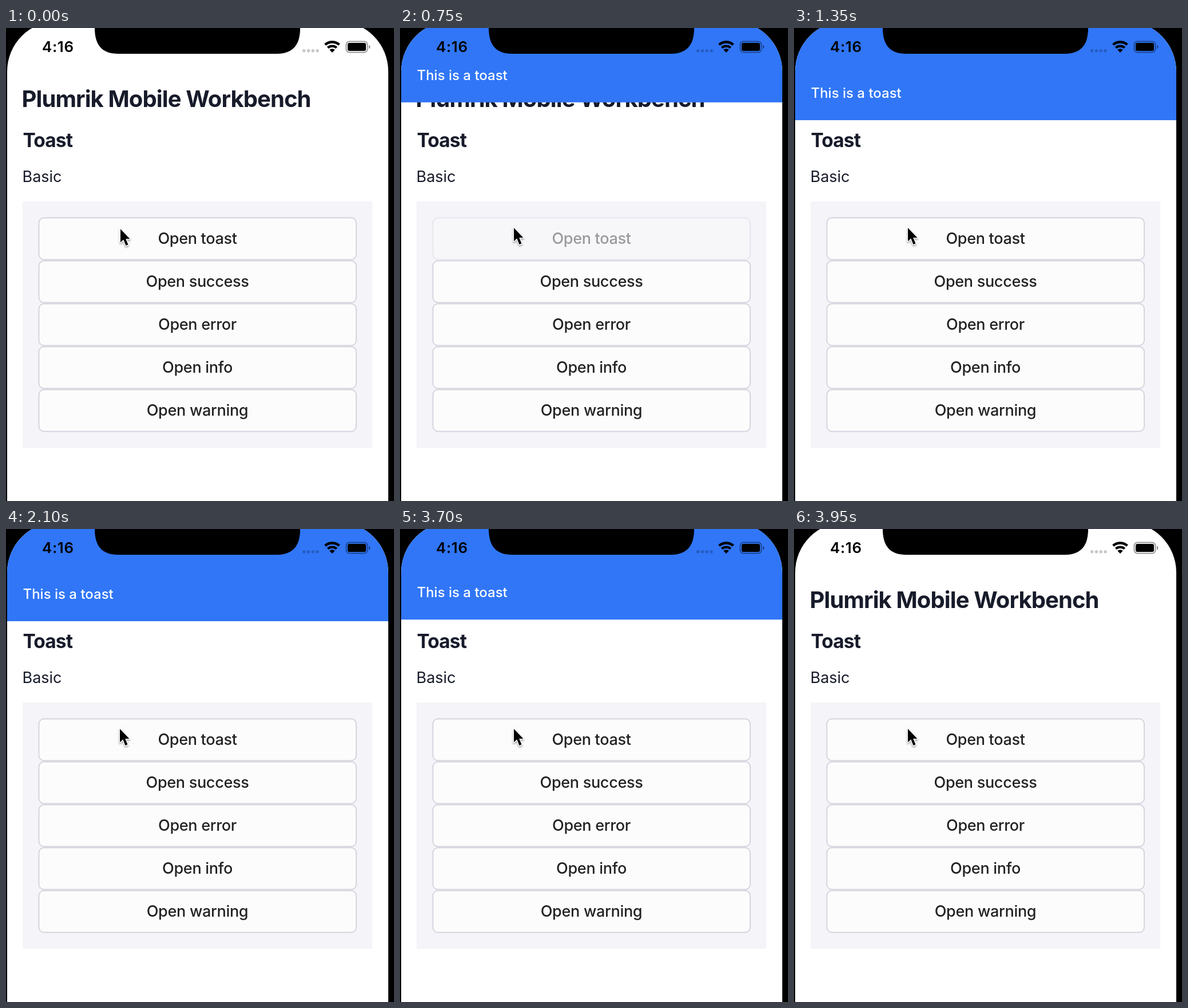
Write an HTML page that moves like this. It is 678 px wide and 826 px high and loops after 4.8 s.

```html
<!DOCTYPE html>
<html lang="en">
<head>
<meta charset="utf-8">
<title>Toast</title>
<style>
  html, body { margin: 0; width: 100%; height: 100%; overflow: hidden; background: #000; }
  svg { display: block; font-family: Inter, "Liberation Sans", sans-serif; }
  .dark { fill: #171b2a; }
  .button rect { fill: #fcfcfc; stroke: #d6d5de; stroke-width: 2; }
  .button text { fill: #222; font-size: 27px; font-weight: 500; letter-spacing: -.3px; text-anchor: middle; }
  #cursor path { stroke: #fff; stroke-width: 3; stroke-linejoin: round; paint-order: stroke; filter: drop-shadow(0 2px 1.5px rgba(0, 0, 0, .35)); }
</style>
</head>
<body>
<svg width="678" height="826" viewBox="0 0 678 826">
  <clipPath id="screen"><rect x="2" y="-12" width="666" height="1000" rx="88"/></clipPath>
  <g clip-path="url(#screen)">
    <rect width="678" height="826" fill="#fff"/>
    <g class="dark">
      <text x="27.5" y="138" font-size="40" font-weight="700" letter-spacing="-.9">Plumrik Mobile Workbench</text>
      <text x="29.5" y="208" font-size="33.5" font-weight="700" letter-spacing="-.9">Toast</text>
      <text x="28.5" y="269" font-size="27">Basic</text>
    </g>
    <rect x="29" y="303" width="611" height="430" fill="#f4f4f9"/>
    <g id="buttons"></g>
    <g id="toast">
      <rect y="-40" width="678" height="201" fill="#3076f7"/>
      <text x="29.5" y="122" font-size="24" font-weight="500" fill="#fff">This is a toast</text>
    </g>
  </g>

  <!-- Notch and status bar -->
  <path d="M155 0C155 30 168 45 196 45H473C501 45 514 30 514 0Z"/>
  <text x="63" y="42" font-size="26" font-weight="600" letter-spacing=".6">4:16</text>
  <path d="M520.7 39.8h24" stroke="#000" stroke-opacity=".22" stroke-width="5.4" stroke-linecap="round" stroke-dasharray="0 7.8"/>
  <g fill="none" stroke="#000">
    <path d="M557.6 29.2a18.6 18.6 0 0 1 24.8 0" stroke-width="4.4"/>
    <path d="M562.3 34.5a11.5 11.5 0 0 1 15.4 0" stroke-width="4.2"/>
  </g>
  <path d="M570 43L565.3 38.1a6.8 6.8 0 0 1 9.4 0Z"/>
  <rect x="594.5" y="23.5" width="37" height="19" rx="5.5" fill="none" stroke="#000" stroke-opacity=".4" stroke-width="2"/>
  <rect x="597" y="26" width="32" height="14" rx="3"/>
  <path d="M634 29.5q2.5 1 2.5 3.5t-2.5 3.5Z" fill-opacity=".45"/>

  <g id="cursor"><path d="M0 0V23.5L5.3 18.5L9.5 29L13.5 27.3L9.2 17.3H16.5Z"/></g>
</svg>
<script>
  const LOOP = 4800, STEP = 50, PRESS = 550, RELEASE = 660;
  const SHOW = 547, HIDE = 3691, TRAVEL = 322;
  const $ = id => document.getElementById(id);

  $('buttons').innerHTML = ['toast', 'success', 'error', 'info', 'warning'].map((name, i) =>
    `<g class="button" transform="translate(0 ${i * 75})">
      <rect x="57.5" y="331.5" width="554.5" height="73" rx="9"/>
      <text x="334.5" y="377">Open ${name}</text>
    </g>`).join('');
  const pressed = $('buttons').firstElementChild;

  // Distance left on a damped spring, from 1 to 0
  function spring(ms) {
    const s = Math.max(0, ms) / 1000, w = 8.68, d = 12.5;
    return Math.exp(-d * s) * (Math.cos(w * s) + d / w * Math.sin(w * s));
  }

  const easeInOut = x => x < .5 ? 2 * x * x : 1 - 2 * (1 - x) ** 2;

  function buttonOpacity(t) {
    if (t < PRESS) return 1;
    const x = Math.min(1, Math.max(0, (t - RELEASE) / 250));
    return .22 + .78 * easeInOut(x);
  }

  function draw() {
    const t = Math.floor(performance.now() % LOOP / STEP) * STEP;
    const away = t < HIDE ? spring(t - SHOW) : 1 - spring(t - HIDE);
    $('toast').setAttribute('transform', `translate(0 ${-TRAVEL * away})`);
    pressed.setAttribute('opacity', buttonOpacity(t));
    $('cursor').setAttribute('transform', t < PRESS ? 'translate(200 351)' : 'translate(199 349)');
    requestAnimationFrame(draw);
  }
  draw();
</script>
</body>
</html>
```
